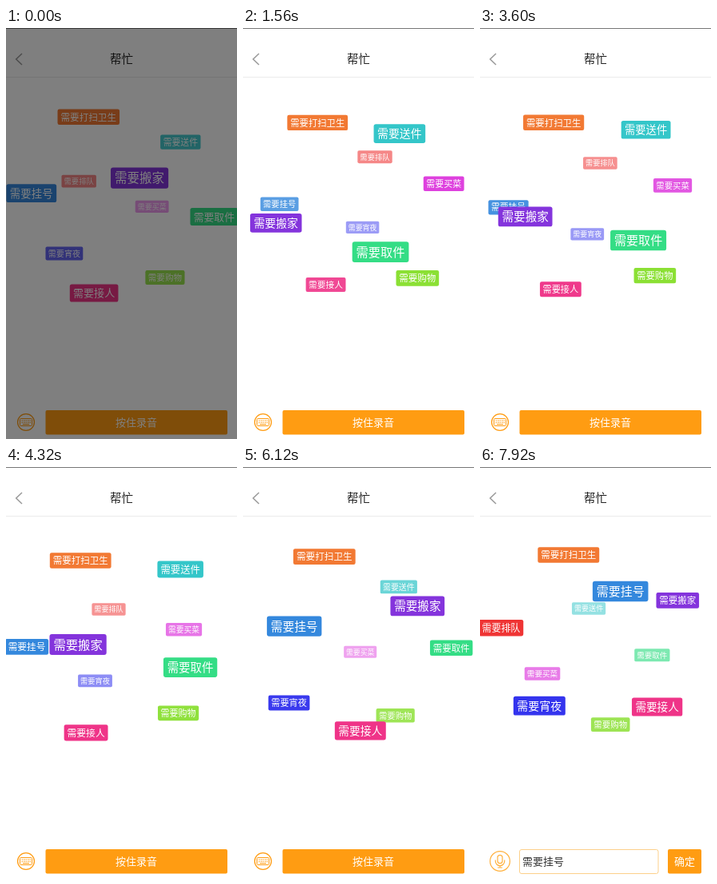
An HTML page for the animation above (8 s loop, 289 px wide and 514 px high).

```html
<!DOCTYPE html>
<html lang="zh-CN">
<head>
<meta charset="utf-8">
<title>帮忙</title>
<style>
  html, body { margin: 0; width: 100%; height: 100%; overflow: hidden; background: #fff; }
  svg { display: block; width: 100%; height: 100%; }
  text { font-family: "Noto Sans CJK SC", "Noto Sans CJK", "Noto Sans", sans-serif; }
  .mid { text-anchor: middle; }
  .white { fill: #fff; }
  .line { fill: none; stroke: #ff9c12; stroke-width: 1.3; }
  .thin { stroke-width: 1; }
  .pale { stroke: #ffb13f; stroke-width: 1.2; }
</style>
</head>
<body>
<svg viewBox="0 0 289 514">
  <rect width="289" height="514" fill="#fff"/>
  <rect width="289" height="1" fill="#777"/>
  <path d="M0 61.5H289" stroke="#ebebeb"/>
  <path d="M20 32L12.7 39L20 46" fill="none" stroke="#999" stroke-width="1.5"/>
  <text class="mid" x="144.5" y="44.3" font-size="14.5" fill="#222">帮忙</text>
  <circle id="touch" cx="136" cy="225" r="9.3" fill="#fff" stroke="#c3c0ee" stroke-width="1.4"/>
  <g id="cloud"></g>
  <g id="voice">
    <circle class="line" cx="25" cy="493" r="10.4"/>
    <rect class="line thin" x="17.5" y="488.5" width="15" height="9" rx="1"/>
    <path class="line thin" d="M19.5 491H31M19.5 493.3H31" stroke-dasharray="1.6 .9"/>
    <path class="line thin" d="M21 495.6H29"/>
    <rect x="49.5" y="478" width="227.5" height="30.5" rx="2" fill="#ff9c12"/>
    <text class="mid white" x="163" y="497.8" font-size="13">按住录音</text>
  </g>
  <g id="entry">
    <g class="line pale">
      <circle cx="25" cy="493" r="12.4"/>
      <rect x="22" y="485.3" width="6" height="10.4" rx="3"/>
      <path d="M19.3 491.5V493A5.7 5.7 0 0 0 30.7 493V491.5M25 498.7V501M22 501H28"/>
    </g>
    <rect x="49.5" y="478.5" width="173.5" height="30" rx="2.5" fill="#fff" stroke="#fdd08a"/>
    <text x="53" y="497.8" font-size="13" fill="#333">需要挂号</text>
    <rect x="235" y="478" width="42" height="30.5" rx="2" fill="#ff9c12"/>
    <text class="mid white" x="256" y="497.8" font-size="13">确定</text>
  </g>
  <rect id="shade" width="289" height="514" opacity=".5"/>
</svg>
<script>
const LOOP = 8000, RADIUS = 115, DEPTH = 410, CX = 144, CY = 222;
const RAD = Math.PI / 180;
const $ = id => document.getElementById(id);

// label, colour, distance along the spin axis, angle around it
const tags = [
  ['打扫卫生', '#f27933', -114.4, -31],
  ['送件', '#34c6c9', -55.8, 93],
  ['排队', '#ef3434', -58, 203],
  ['挂号', '#3488dd', -38.3, 301],
  ['搬家', '#8434dc', -14.2, 5],
  ['买菜', '#dc35dc', 12.3, 149.5],
  ['宵夜', '#3434ee', 37.7, 235.7],
  ['取件', '#34dd85', 45, 55.3],
  ['接人', '#ef3488', 83.5, -53],
  ['购物', '#8be034', 108.4, 129.5]
].map(([name, color, v, angle]) => {
  const w = name.length > 2 ? 75.5 : 52.5;
  const el = document.createElementNS('http://www.w3.org/2000/svg', 'g');
  el.innerHTML =
    `<rect x="${-w / 2}" y="-9.6" width="${w}" height="19.2" rx="2.2" fill="${color}"/>` +
    `<text class="mid white" y="4.2" font-size="11.3">需要${name}</text>`;
  return { el, v, angle, ring: Math.sqrt(RADIUS ** 2 - v ** 2) };
});

// time, spin and roll in degrees, forward tilt: drags back and forth, then steady drift
const keys = [
  [0, 7, 17.8, -.04], [800, -28, 19, 0], [1560, -52.8, 20.3, .025], [2640, -81, 21, .015],
  [3240, -52, 21, 0], [3600, -41, 21, 0], [4080, -32, 21, 0], [5040, 0, 21, 0],
  [6120, 31, 21, 0], [8000, 83, 21, 0]
];

function pose(t) {
  const i = Math.max(1, keys.findIndex(k => k[0] >= t));
  const a = keys[i - 1], b = keys[i];
  const f = (t - a[0]) / (b[0] - a[0]);
  return a.map((n, j) => n + (b[j] - n) * f);
}

function show(id, on) {
  $(id).style.display = on ? '' : 'none';
}

function draw(t) {
  const [, spin, roll, tilt] = pose(t);
  const cos = Math.cos(roll * RAD), sin = Math.sin(roll * RAD);
  for (const tag of tags) {
    const a = (tag.angle + spin) * RAD;
    tag.z = tag.ring * Math.cos(a);
    const s = DEPTH / (DEPTH - tag.z);
    const u = tag.ring * Math.sin(a) * s;
    const v = (tag.v + tag.z * tilt) * s;
    const x = CX + u * cos + v * sin;
    const y = CY - u * sin + v * cos;
    tag.el.setAttribute('transform', `translate(${x.toFixed(2)} ${y.toFixed(2)}) scale(${s.toFixed(4)})`);
    tag.el.setAttribute('opacity', Math.min(1, 1 + .55 * tag.z / RADIUS).toFixed(3));
  }
  tags.sort((p, q) => p.z - q.z);
  $('cloud').append(...tags.map(tag => tag.el));

  show('shade', t < 120);
  show('touch', t >= 2520 && t < 2760);
  show('voice', t < 7200);
  show('entry', t >= 7200);
}

const start = performance.now();
function tick() {
  draw((performance.now() - start) % LOOP);
  requestAnimationFrame(tick);
}
tick();
</script>
</body>
</html>
```
